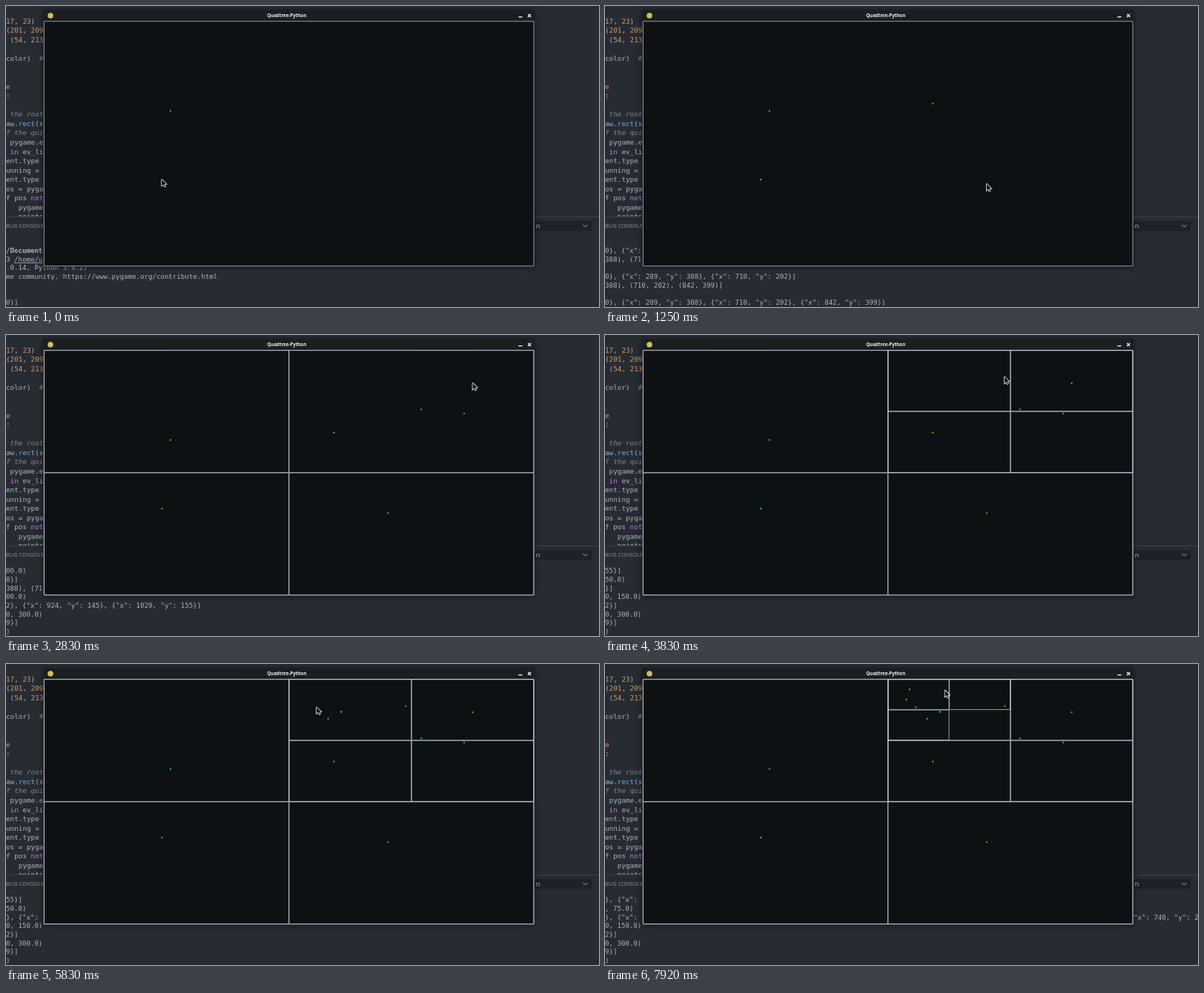
Animation of 800x406 px, one loop 8000 ms. Source, as an HTML page with a canvas:

```html
<!DOCTYPE html>
<html lang="en">
<head>
<meta charset="utf-8">
<title>Quadtree</title>
<style>
  html, body { margin: 0; width: 100%; height: 100%; overflow: hidden; background: #272c33; }
  canvas { display: block; }
</style>
</head>
<body>
<canvas id="stage" width="800" height="406"></canvas>
<script>
const ctx = document.getElementById('stage').getContext('2d');
const LOOP = 8000, TICK = 1000 / 12, CAPACITY = 4;
const MONO = '"DejaVu Sans Mono", monospace', SANS = '"Open Sans", sans-serif';
const GREY = '#abb2bf', WHITE = '#eceff1', BACK = '#272c33';

// The quadtree world is 1200 x 600, shown scaled inside the window.
const WORLD = { left: 51.1, top: 20.4, scale: 0.551 };

// Each click adds a point: tick (1/12 s) and world position. One spot is clicked twice.
const clicks = [
  [-8, 310, 220], [1, 289, 388], [10, 710, 202], [14, 842, 399], [22, 924, 145],
  [29, 1029, 155], [38, 1050, 81], [46, 886, 66], [54, 728, 80], [58, 728, 80],
  [66, 696, 97], [74, 668, 69], [82, 645, 50], [89, 653, 25], [94, 740, 28]
].map(([tick, x, y]) => ({ tick, x, y }));

const code = `17, 23)
(201, 209,
 (54, 213,

color)  #


e
:

# the root
aw.rect(s
#f the qui
 pygame.e
 in ev_li
ent.type
unning =
ent.type
os = pyga
f pos not
   pygame
   points`.split('\n');

const banner = ['/Document', '3 /home/u', '.0.14, Python 3.9.2)',
  'me community. https://www.pygame.org/contribute.html'];

function text(str, x, y, font, color = GREY) {
  ctx.font = font;
  ctx.fillStyle = color;
  ctx.fillText(str, x, y);
  return ctx.measureText(str).width;
}

function box(x, y, w, h, color) {
  ctx.fillStyle = color;
  ctx.fillRect(x, y, w, h);
}

function polyline(coords, x, y, color, width) {
  ctx.beginPath();
  coords.forEach(([dx, dy]) => ctx.lineTo(x + dx, y + dy));
  ctx.strokeStyle = color;
  ctx.lineWidth = width;
  ctx.stroke();
}

function tokenColor(token) {
  if (/^\d/.test(token)) return '#d19a66';
  if (token === 'rect') return '#61afef';
  if (token === 'in' || token === 'not') return '#c678dd';
  return token === '#' ? '#7f848e' : GREY;
}

function drawEditor() {
  code.forEach((line, row) => {
    const y = 23.8 + 12.55 * row;
    if (line[0] === '#') {
      text(line.slice(1), 0, y, 'italic 9.3px ' + MONO, '#7f848e');
    } else if (line === 'e') {
      text(line, 0, y, '9.3px ' + MONO, '#d19a66');
    } else {
      let x = 0;
      for (const token of line.match(/\w+|\W/g) || []) x += text(token, x, y, '9.3px ' + MONO, tokenColor(token));
    }
  });
  box(0, 285, 800, 121, BACK);
  box(0, 284, 800, 1, '#3b4149');
  text('BUG CONSOLE', 0, 299, '7.4px ' + SANS, '#8b919b');
  box(700, 290, 90, 13.5, '#1e2227');
  text('n', 714.8, 299.8, '9px ' + SANS, '#c5cad2');
  polyline([[-3, -1.5], [0, 1.5], [3, -1.5]], 781.5, 296.5, GREY, 1);
}

// The left part of every printed line lies outside the picture.
const crop = str => str.slice(18);
const tuples = list => crop(list.map(p => `(${p.x}, ${p.y})`).join(', ') + ']');
const records = list => crop(list.map(p => `{"x": ${p.x}, "y": ${p.y}}`).join(', ') + ']');

function consoleRows(made) {
  const all = clicks.slice(0, CAPACITY);
  if (made.length <= CAPACITY) {
    const rows = ['', ...banner];
    made.forEach((_, i) => rows.push(tuples(made.slice(0, i + 1)), '', records(made.slice(0, i + 1))));
    return rows.slice(-8);
  }
  const northEast = made.filter(p => p.x >= 600 && p.y < 300);
  const inner = northEast.filter(p => p.x < 900 && p.y < 150);
  const tail = ['0, 300.0)', records([all[3]]), ')'];
  if (northEast.length <= CAPACITY) {
    const head = northEast.length < 3 ? ['', records(all)] : ['00.0)', records([all[1]])];
    return [...head, tuples(all), '00.0)', records(northEast), ...tail];
  }
  const head = inner.length > CAPACITY
    ? [records(inner.slice(1)), ', 75.0)']
    : [records([clicks[5]]), '50.0)'];
  return [...head, records(inner), '0, 150.0)', records([all[2]]), ...tail];
}

function drawConsole(made) {
  consoleRows(made).forEach((line, i) => {
    const y = 321.3 + 11.65 * i, weight = line === banner[0] ? 'bold ' : '';
    text(line, 0, y, weight + '9.12px ' + MONO);
    if (line === banner[1]) box(11, y + 1.5, 40, 0.8, GREY);
  });
}

function drawWindow() {
  ctx.save();
  ctx.shadowColor = 'rgba(0,0,0,.45)';
  ctx.shadowBlur = 9;
  ctx.shadowOffsetY = 1;
  box(50, 5, 663, 347, '#1b1f22');
  ctx.restore();
  box(51, 20, 661.5, 331, '#0d1114');
  ctx.fillStyle = '#cdc257';
  ctx.beginPath();
  ctx.arc(60, 13, 3.8, 0, 7);
  ctx.fill();
  ctx.textAlign = 'center';
  text('Quadtree-Python', 378.7, 15.2, 'bold 6.15px ' + SANS, WHITE);
  ctx.textAlign = 'left';
  box(691.5, 14, 5, 1.4, WHITE);
  for (const d of [-2, 2]) polyline([[-2, -d], [2, d]], 706.2, 13, WHITE, 1.4);
}

// Adds the outline of every node that holds points; full nodes split in four.
function traceNode(held, x, y, w, h) {
  if (!held.length) return;
  ctx.rect(x + 0.5, y + 0.5, w - 1, h - 1);
  if (held.length <= CAPACITY) return;
  w /= 2;
  h /= 2;
  for (const left of [x, x + w])
    for (const top of [y, y + h])
      traceNode(held.filter(p => p.x >= left && p.x < left + w && p.y >= top && p.y < top + h), left, top, w, h);
}

function drawTree(made) {
  ctx.save();
  ctx.translate(WORLD.left, WORLD.top);
  ctx.scale(WORLD.scale, WORLD.scale);
  ctx.beginPath();
  traceNode(made, 0, 0, 1200, 600);
  ctx.strokeStyle = '#c9d1d9';
  ctx.lineWidth = 1.3;
  ctx.stroke();
  ctx.fillStyle = '#36d53f';
  for (const p of made) {
    ctx.beginPath();
    ctx.arc(p.x, p.y, 2, 0, 7);
    ctx.fill();
  }
  ctx.restore();
}

// After a click the pointer eases to the next spot within four ticks.
function drawPointer(tick, made) {
  const from = made[made.length - 1], to = clicks[made.length] || from;
  const start = Math.max(from.tick, to.tick - 8);
  const p = Math.min(1, Math.max(0, (tick - start) / 4));
  const ease = p * p * (3 - 2 * p);
  const x = WORLD.left + WORLD.scale * (from.x + (to.x - from.x) * ease);
  const y = WORLD.top + WORLD.scale * (from.y + (to.y - from.y) * ease);
  const arrow = [[0, 0], [0, 8.6], [2, 6.9], [3.5, 9.9], [4.8, 9.3], [3.5, 6.4], [6, 6.2], [0, 0]];
  polyline(arrow, x - 0.2, y - 0.4, WHITE, 1.6);
  ctx.fillStyle = '#111';
  ctx.fill();
}

// The screen refreshes on two of every four ticks.
function refreshTick(ms) {
  const n = Math.floor((ms + 4) / TICK);
  return Math.max(0, n - [2, 0, 0, 1][n % 4]);
}

function draw(ms) {
  const tick = refreshTick(ms % LOOP);
  const made = clicks.filter(p => p.tick <= tick);
  box(0, 0, 800, 406, BACK);
  drawEditor();
  drawConsole(made);
  drawWindow();
  drawTree(made);
  drawPointer(tick, made);
}

let startTime;
function frame(now) {
  startTime ??= now;
  draw(now - startTime);
  requestAnimationFrame(frame);
}
requestAnimationFrame(frame);
</script>
</body>
</html>
```
